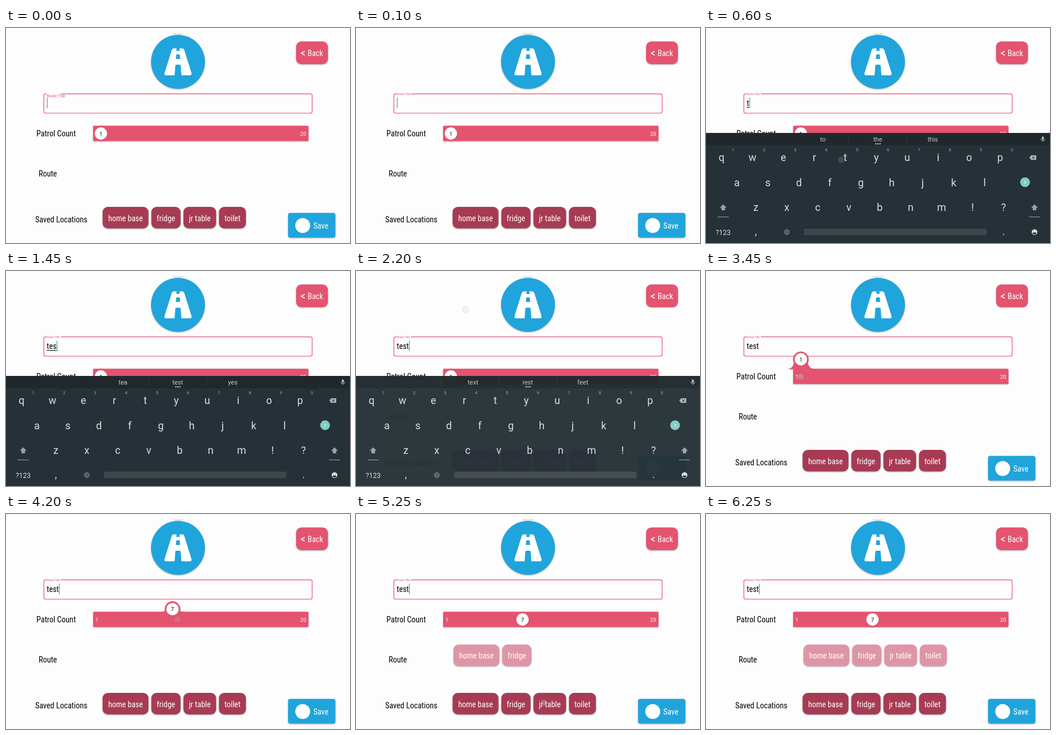
Write an HTML page that moves like this. It is 600x375 px and loops after 6.3 s.

```html
<!DOCTYPE html>
<html lang="en">
<head>
<meta charset="utf-8">
<title>Route editor</title>
<style>
  html, body { margin: 0; height: 100%; overflow: hidden; background: #fefdfe; }
  svg { display: block; width: 100vw; height: 100vh; }
  text { font: 14px Roboto, sans-serif; }
  .c { font-family: "Roboto Condensed", Roboto, sans-serif; font-stretch: 75%; }
  .mid { text-anchor: middle; }
  .w { fill: #fff; }
  .num { font-size: 9.3px; }
  .pink { fill: #e4536f; }
  .blue { fill: #20a4dc; }
  .lift { filter: drop-shadow(0 1px 1px rgba(0, 0, 0, .35)); }
  #kb text { fill: #d9dee0; text-anchor: middle; }
  #kb .key { font-size: 18px; }
  #kb .hint { font-size: 8px; fill: #9aa2a6; }
  #kb .sug { font-size: 11px; fill: #c3c9cc; }
</style>
</head>
<body>
<svg viewBox="0 0 600 375">
  <path d="M291 8.5q1 2 4 2h10q3 0 4-2" fill="none" stroke="#bbb"/>
  <circle class="blue lift" cx="300" cy="59" r="47"/>
  <path class="w" d="M293 35.5h14q3 0 4 3l12.500 40q1 4-3 4h-41q-4 0-3-4l12.500-40q1-3 4-3z"/>
  <path class="blue" d="M297.500 35h5l.4 5h-5.800zM297 46h6l.8 8h-7.600zM297 64h6q1.500 0 1.700 2l1.300 17h-12l1.300-17q.2-2 1.700-2z"/>

  <g class="lift"><rect class="pink" x="506" y="23.500" width="55.500" height="39.500" rx="9"/></g>
  <path d="M521 40.500l-6 3.500 6 3.500" fill="none" stroke="#fff" stroke-width="1.500"/>
  <text class="c w" x="526" y="49">Back</text>

  <path d="M95.500 114.800H531q3 0 3 3v27.700q0 3-3 3H69q-3 0-3-3v-27.700q0-3 3-3h1.500" fill="none" stroke="#e4536f" stroke-width="1.200"/>
  <text id="label" class="pink" x="71">Route Title</text>
  <text id="typed" class="c" x="71" y="136"></text>
  <rect id="under" x="71" y="138" height="1"/>
  <rect id="cursor" y="121.500" width="1.300" height="18.500" fill="#2db7bb"/>

  <text class="c" x="53" y="189">Patrol Count</text>
  <text class="c" x="57" y="259">Route</text>
  <text class="c" x="51" y="339">Saved Locations</text>

  <g class="lift pink">
    <rect x="152" y="170.500" width="375.500" height="26.500" rx="1.500"/>
    <path id="neck"/>
    <circle id="bulb" r="13.500"/>
  </g>
  <text class="num w" x="156" y="187.500">1</text>
  <text class="num w" x="523.500" y="187.500" text-anchor="end">20</text>
  <circle id="knob" class="w" r="10.700"/>
  <text id="count" class="num mid"></text>

  <g id="route"></g>
  <g id="saved"></g>

  <g class="lift"><rect class="blue" x="492" y="322.500" width="82.500" height="43" rx="4"/></g>
  <circle class="w" cx="517.500" cy="344.500" r="13"/>
  <text class="c w" x="536" y="349.500">Save</text>

  <g id="kb"></g>
  <circle id="touch" r="5.500" fill="#c8c8c8" fill-opacity=".35" stroke="#777" stroke-opacity=".4"/>
</svg>
<script>
const LOOP = 6300;
const $ = id => document.getElementById(id);
const set = (el, attrs) => { for (const k in attrs) el.setAttribute(k, attrs[k]); };
const ramp = (t, a, b) => Math.min(1, Math.max(0, (t - a) / (b - a)));
const ease = p => p * p * (3 - 2 * p);

// Location chips: name, left edge, width, time it joins the route
const chips = [['home base', 168.5, 80, 4740], ['fridge', 253.5, 51, 5020],
               ['jr table', 309.5, 57, 5300], ['toilet', 371.5, 47, 5620]];
const chip = ([name, x, w], y, fill) => `<g><g class="lift">
  <rect x="${x}" y="${y}" width="${w}" height="37.500" rx="9" fill="${fill}"/></g>
  <text class="c w mid" x="${x + w / 2}" y="${y + 24.5}">${name}</text></g>`;
$('saved').innerHTML = chips.map(c => chip(c, 312, '#a73b54')).join('');
$('route').innerHTML = chips.map(([n, x, w]) => chip([n, x + 1.5, w], 227.8, '#df95a6')).join('');

// Keyboard
const label = (s, x, y, cls) => `<text class="${cls}" x="${x}" y="${y}">${s}</text>`;
const row = (keys, x, y, cls = 'key') => [...keys].map((k, i) => label(k, x + 54 * i, y, cls)).join('');
const shift = x => `<path d="M${x} 307.500l6 6h-3v4.500h-6v-4.500h-3z" fill="#9aa2a6"/>
  <path d="M${x - 9.5} 329.500h19" stroke="#9aa2a6"/>`;
$('kb').innerHTML = `
  <rect y="183" width="600" height="192" fill="#263137"/>
  <rect y="183" width="600" height="22" fill="#21282c"/>
  <path d="M249 187v13M350 187v13" stroke="#343c40"/>
  ${[204, 299.5, 395.5].map(x => label('', x, 198, 'sug')).join('')}
  ${[296.5, 300, 303.5].map(x => `<circle cx="${x}" cy="202" r="1.100" fill="#fff"/>`).join('')}
  <rect x="585.800" y="189" width="3.400" height="6" rx="1.700" fill="#b8bec1"/>
  <path d="M584 193.500a3.500 3 0 0 0 7 0M587.500 196.500v2" fill="none" stroke="#b8bec1"/>
  ${row('1234567890', 47.5, 214.5, 'hint')}
  ${row('qwertyuiop', 27, 232)}${row('asdfghjkl', 54, 275.5)}${row('zxcvbnm!?', 87, 319)}
  <path d="M564 226l3-4h9v8h-9z" fill="#aab1b4"/>
  <path d="M569 224l4 4m0-4l-4 4" stroke="#263137"/>
  <circle cx="556.500" cy="269" r="8.500" fill="#80cbc4"/>
  <path d="M555 266l3 3-3 3" fill="none" stroke="#fff"/>
  ${shift(30)}${shift(573)}
  <text x="30" y="360.500" style="font-size:12px">?123</text>
  ${label(',', 87, 361, 'key')}${label('.', 519, 361, 'key')}
  <g fill="none" stroke="#8b9498" stroke-width=".8"><circle cx="141" cy="356" r="4.500"/>
  <ellipse cx="141" cy="356" rx="2" ry="4.500"/><path d="M137 354.500h8M137 357.500h8"/></g>
  <rect x="171" y="350" width="318" height="11.500" rx="1.500" fill="#3c464b"/>
  <circle cx="573" cy="356" r="4.800" fill="#fff"/>
  <path d="M570 357a3 2.500 0 0 0 6 0zM570.500 354h1.500M574 354h1.500" fill="#263137" stroke="#263137"/>`;
const sugs = document.querySelectorAll('.sug');

// Typing: time, text so far, suggestions
const words = [[0, '', 'I the thanks'], [550, 't', 'to the this'], [840, 'te', 'tell ten text'],
               [1140, 'tes', 'tea test yes'], [1625, 'test', 'text rest feet']];
const lastKey = 1625;

// Touches: start, end, x, y
const touches = [[500, 640, 236, 230], [780, 900, 133, 228], [1080, 1200, 108, 270],
  [1570, 1690, 240, 228], [2080, 2240, 191, 67], [3250, 4240, 168, 184],
  [4650, 4780, 208, 331], [4940, 5060, 279, 331], [5210, 5350, 328, 329], [5540, 5680, 394, 331]];

function drawSlider(t) {
  const p = .359 * ease(ramp(t, 3450, 4020));
  const x = 165.5 + 348 * p;
  const lift = 30 * (ease(ramp(t, 3260, 3420)) - ease(ramp(t, 4115, 4315)));
  const y = 184 - lift;
  const spread = 13 + 11 * Math.min(1, lift / 19);
  set($('neck'), { d: `M${x - spread} 171Q${x - 13} 171 ${x - 11} ${y + 2}H${x + 11}Q${x + 13} 171 ${x + spread} 171Z` });
  for (const id of ['bulb', 'knob']) set($(id), { cx: x, cy: y });
  set($('count'), { x, y: y + 3.5 });
  $('count').textContent = Math.floor(1 + 19 * p);
  return x;
}

function drawField(t) {
  const [, text, options] = words.findLast(w => t >= w[0]);
  $('typed').textContent = text;
  const width = text ? $('typed').getComputedTextLength() : 0;
  set($('under'), { width: t < 2150 ? width : 0 });
  const on = t < lastKey || (t - lastKey) % 500 < 250;
  set($('cursor'), { x: 71.3 + width, opacity: +on });
  options.split(' ').forEach((s, i) => sugs[i].textContent = s);

  const rise = ease(ramp(t, 0, 120));
  set($('label'), { y: 121.5 - 4.8 * rise });
  $('label').style.fontSize = 6.9 - 2.1 * rise + 'px';
}

function draw(t) {
  drawField(t);
  const knobX = drawSlider(t);
  chips.forEach((c, i) => set($('route').children[i], { opacity: +(t >= c[3]) }));

  const shown = ease(ramp(t, 150, 300)) - ease(ramp(t, 2185, 2330));
  set($('kb'), { opacity: shown, transform: `translate(0 ${16 * (1 - shown) ** 2})` });

  const hit = touches.find(([a, b]) => t >= a && t < b);
  set($('touch'), { opacity: 0 });
  if (hit) {
    const [, end, x, y] = hit;
    const drag = y === 184;
    set($('touch'), { cx: drag ? knobX + 9 * ramp(t, 3450, 4020) : x, cy: y, opacity: ramp(t, end, end - 80) });
  }
}

const start = performance.now();
function tick() {
  draw((performance.now() - start) % LOOP);
  requestAnimationFrame(tick);
}
tick();
</script>
</body>
</html>
```
